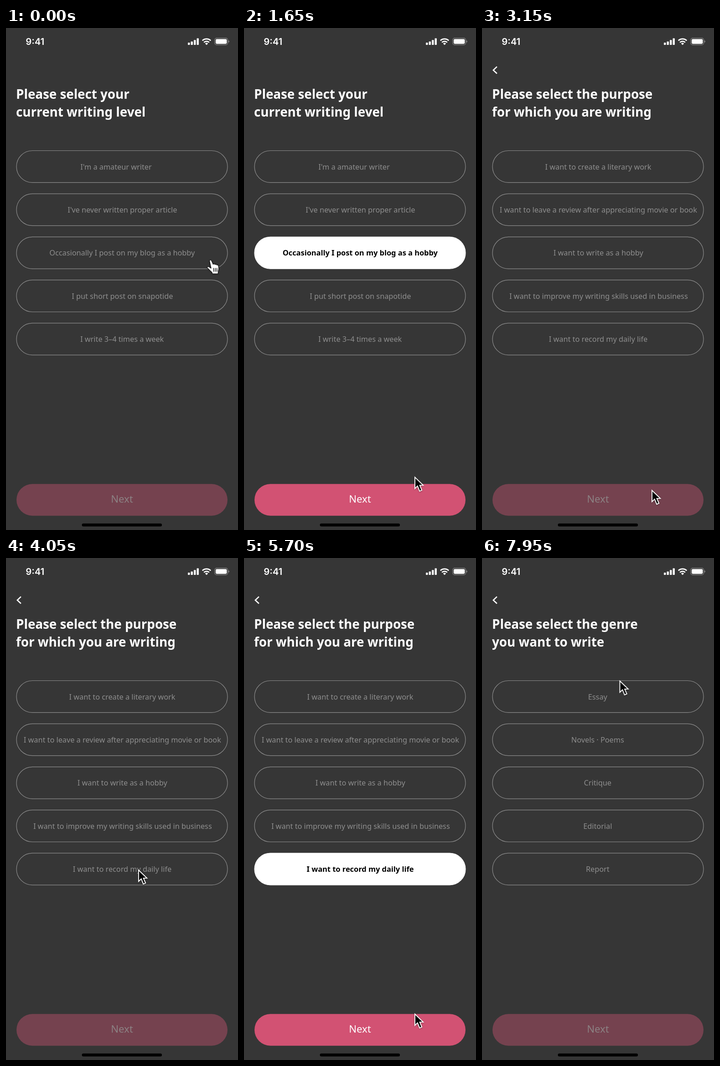
Write an HTML page that moves like this. It is 509 by 1099 pixels and loops after 8000 ms.

```html
<!DOCTYPE html>
<html lang="en">
<head>
<meta charset="utf-8">
<title>Onboarding survey</title>
<style>
html, body { margin: 0; width: 100%; height: 100%; overflow: hidden; background: #363636; }
svg { display: block; width: 100%; height: 100%; }
text { font-family: "Noto Sans", "Open Sans", sans-serif; }
.title { font-size: 27.75px; font-weight: 700; fill: #fff; }
.option { fill: none; stroke: #8c8c8c; stroke-width: 1.2; }
.label { font-size: 16.25px; fill: #8e8e8e; text-anchor: middle; }
.on .option.picked { fill: #fff; stroke: #fff; }
.on .label.picked { font-size: 16.4px; font-weight: 700; fill: #000; }
.next { fill: #75424f; }
.next-label { font-size: 22px; font-weight: 500; fill: #8c8183; text-anchor: middle; }
.on .next { fill: #d25273; }
.on .next-label { fill: #fff; }
.clock { font: 600 20.3px Inter, Roboto, sans-serif; fill: #fff; }

.screen, .cursor, .hand, .arrow { animation: 8s linear infinite both; }
#level-on { animation-name: level-on; }
#purpose { animation-name: purpose; }
#purpose-on { animation-name: purpose-on; }
#genre { animation-name: genre; }
@keyframes level-on { 0%, 7.9% { opacity: 0 } 11.65%, 100% { opacity: 1 } }
@keyframes purpose { 0%, 27.5% { opacity: 0 } 31.25%, 100% { opacity: 1 } }
@keyframes purpose-on { 0%, 58.75% { opacity: 0 } 62.5%, 100% { opacity: 1 } }
@keyframes genre { 0%, 82.5% { opacity: 0 } 86.25%, 100% { opacity: 1 } }

.cursor { animation-name: move; filter: drop-shadow(0 1.5px 1.5px rgba(0, 0, 0, .35)); }
.hand { animation-name: hand; animation-timing-function: step-end; }
.arrow { animation-name: arrow; animation-timing-function: step-end; }
@keyframes hand { 0% { opacity: 1 } 12.5%, 100% { opacity: 0 } }
@keyframes arrow { 0% { opacity: 0 } 12.5%, 100% { opacity: 1 } }
@keyframes move {
  0% { transform: translate(447px, 508px) }
  12% { transform: translate(447px, 508px); animation-timing-function: ease-in }
  16.5% { transform: translate(410px, 760px) }
  20.625% { transform: translate(374px, 981px); animation-timing-function: ease-out }
  23.125% { transform: translate(372px, 1010px) }
  39.375% { transform: translate(372px, 1010px); animation-timing-function: ease-in-out }
  49.375% { transform: translate(290px, 681px) }
  62% { transform: translate(290px, 681px); animation-timing-function: ease-in }
  68.75% { transform: translate(360px, 934px) }
  71.25% { transform: translate(374px, 996px); animation-timing-function: ease-out }
  73.75% { transform: translate(373px, 1012px) }
  78.125% { transform: translate(373px, 1012px) }
  80% { transform: translate(374.5px, 1010px) }
  92.6% { transform: translate(374.5px, 1010px); animation-timing-function: ease-in-out }
  99.375%, 100% { transform: translate(301.5px, 267px) }
}
</style>
</head>
<body>
<svg viewBox="0 0 509 1099" preserveAspectRatio="none">
  <rect width="509" height="1099" fill="#363636"/>
  <g id="screens"></g>

  <g id="status" fill="#fff">
    <text class="clock" x="43.3" y="36.5">9:41</text>
    <rect x="399" y="32" width="4.4" height="5" rx="1"/>
    <rect x="405.5" y="29.5" width="4.4" height="7.5" rx="1"/>
    <rect x="412" y="26.3" width="4.4" height="10.7" rx="1"/>
    <rect x="418.5" y="22.5" width="4.4" height="14.5" rx="1"/>
    <g fill="none" stroke="#fff" stroke-width="2.7">
      <path d="M430.8 27.6a13.2 13.2 0 0 1 18.4 0"/>
      <path d="M434.2 31.4a8.4 8.4 0 0 1 11.6 0"/>
    </g>
    <path d="M440 37.2l-3.2-3.3a4.6 4.6 0 0 1 6.4 0z"/>
    <rect x="457.8" y="22.1" width="28.8" height="14.8" rx="4.2" fill="none" stroke="#888" stroke-width="1.2"/>
    <rect x="460" y="24.3" width="24.4" height="10.4" rx="2.4"/>
    <path d="M488 27v5q1.9-.7 1.9-2.5t-1.9-2.5z" fill="#888"/>
  </g>
  <rect x="166.5" y="1084.8" width="175.5" height="6.4" rx="3.2"/>

  <g class="cursor">
    <g class="hand" stroke="#111" stroke-width="1.2" stroke-linecap="round" stroke-linejoin="round">
      <path fill="#fff" d="M-.5 1.8C-.5-.6 2.8-.8 3.8 1.2L7.5 9.5C8.5 8 11 8.2 11.5 10 12.8 8.6 15 9.2 15.5 11 17 10.2 18.8 11 19 13 19.8 17 20.2 20 18.8 23.5L18 30H6L4.5 26.5C1.5 24.5-2 20-5 17.5-6.5 15.5-4 13.5-2 14.8L3 18Z"/>
      <path fill="none" stroke-width="1.5" d="M8.3 18l.5 7M12.1 18l.3 7M15.7 18v7"/>
    </g>
    <path class="arrow" stroke="#fff" stroke-width="1.9"
      d="M.9 2.2V27L6.7 21.5 11.3 32.7 16.2 30.6 11.6 19.9H19.2Z"/>
  </g>
</svg>
<script>
const LEFT = 23, WIDTH = 463, PITCH = 94.4;

const level = {
  title: ["Please select your", "current writing level"],
  options: [
    ["I'm a amateur writer", 241.5],
    ["I've never written proper article", 255.3],
    ["Occasionally I post on my blog as a hobby", 254.8],
    ["I put short post on snapotide", 255.3],
    ["I write 3–4 times a week", 254.7]
  ],
  picked: 2
};
const purpose = {
  title: ["Please select the purpose", "for which you are writing"],
  options: [
    ["I want to create a literary work", 255],
    ["I want to leave a review after appreciating movie or book", 255.3],
    ["I want to write as a hobby", 255.3],
    ["I want to improve my writing skills used in business", 255.8],
    ["I want to record my daily life", 255]
  ],
  picked: 4,
  back: true
};
const genre = {
  title: ["Please select the genre", "you want to write"],
  options: ["Essay", "Novels · Poems", "Critique", "Editorial", "Report"].map(s => [s, 253.8]),
  back: true
};

const pill = (cls, y, h) =>
  `<rect class="${cls}" x="${LEFT}" y="${y}" width="${WIDTH}" height="${h}" rx="${h / 2}"/>`;

function option([label, x], i, picked) {
  const y = 268.5 + i * PITCH;
  const mark = i === picked ? " picked" : "";
  return pill("option" + mark, y, 69.8) +
    `<text class="label${mark}" x="${x}" y="${y + 41}">${label}</text>`;
}

function screen(id, page, on) {
  const title = page.title.map((line, i) =>
    `<text class="title" x="22" y="${155.3 + i * 39}">${line}</text>`).join("");
  const back = page.back
    ? `<path d="M32.8 84.6l-8 7.6 8 7.6" fill="none" stroke="#fff" stroke-width="2.6"/>` : "";
  return `<g class="screen ${on ? "on" : ""}" id="${id}">
    <rect width="509" height="1099" fill="#363636"/>${back}${title}
    ${page.options.map((o, i) => option(o, i, page.picked)).join("")}
    ${pill("next", 998.3, 69.4)}
    <text class="next-label" x="254.5" y="1039.3">Next</text></g>`;
}

document.getElementById("screens").innerHTML =
  screen("level", level) +
  screen("level-on", level, true) +
  screen("purpose", purpose) +
  screen("purpose-on", purpose, true) +
  screen("genre", genre);
</script>
</body>
</html>
```
